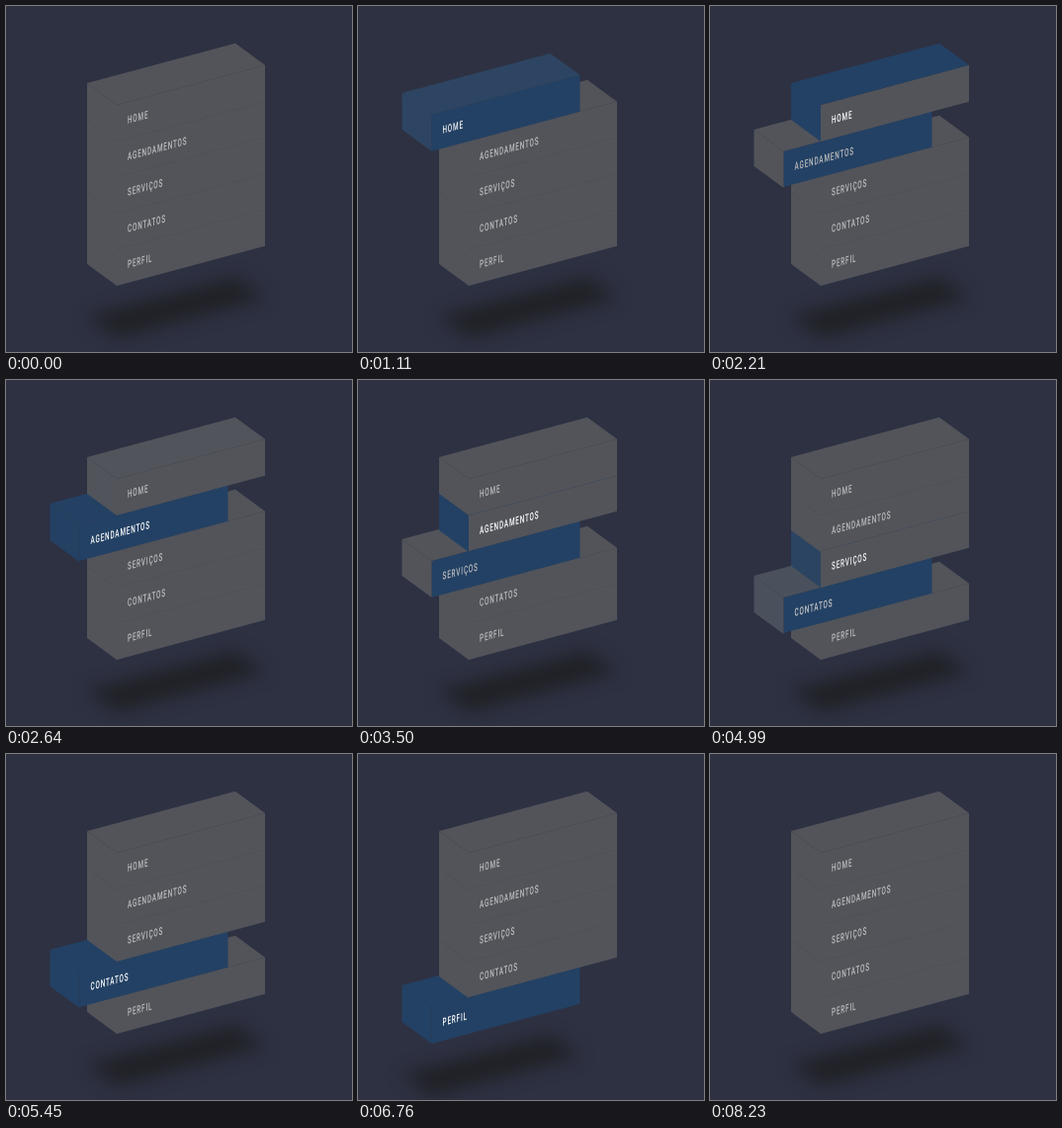
These frames come from a looping animation (350 by 350 pixels, 9.56 s). An HTML page:

```html
<!DOCTYPE html>
<html lang="pt">
<head>
<meta charset="utf-8">
<title>Menu</title>
<style>
  html, body { margin: 0; width: 100%; height: 100%; overflow: hidden; background: #2e3142; }
  ul {
    position: absolute; left: 112px; top: 100px; width: 150px;
    margin: 0; padding: 0; list-style: none;
    transform: skewY(-15deg); transform-origin: 0 0;
  }
  li { position: relative; width: 150px; height: 36.6px; }
  .side, .top { position: absolute; }
  .side { left: -30px; top: 0; width: 30px; height: 100%; transform: skewY(45deg); transform-origin: right; }
  .top { left: 0; top: -30px; width: 100%; height: 30px; transform: skewX(45deg); transform-origin: bottom; }
  li:last-child .top { box-shadow: -90px 90px 15px rgba(31, 32, 36, .9); }
  .label {
    position: absolute; left: 11.25px; top: 0; white-space: nowrap;
    font: 500 11px/38.1px Roboto, "Open Sans", sans-serif; letter-spacing: 1.4px;
    transform: scaleX(.58); transform-origin: 0 0;
  }
</style>
</head>
<body>
<ul id="menu"></ul>
<script>
const LOOP = 9560, FADE = 500, LAG = 10, SLIDE = -37.5;
const LABELS = ['HOME', 'AGENDAMENTOS', 'SERVIÇOS', 'CONTATOS', 'PERFIL'];
// Item i is hovered from HOVER[i] until HOVER[i + 1].
const HOVER = [860, 2210, 3500, 4910, 6260, 7680];
const GREY = [82, 84, 90], BLUE = [35, 65, 100];
const DIM = [189, 189, 189], WHITE = [255, 255, 255];

const menu = document.getElementById('menu');

function add(parent, tag, className = '') {
  const el = document.createElement(tag);
  el.className = className;
  return parent.appendChild(el);
}

const items = LABELS.map((text, i) => {
  const box = add(menu, 'li');
  box.style.zIndex = LABELS.length - i;
  const side = add(box, 'div', 'side');
  const top = add(box, 'div', 'top');
  const label = add(box, 'span', 'label');
  label.textContent = text;
  return { box, side, top, label };
});

const mix = (a, b, k) => `rgb(${a.map((v, i) => Math.round(v + (b[i] - v) * k))})`;

// cubic-bezier(.25, .1, .25, 1)
function ease(x) {
  if (x <= 0) return 0;
  if (x >= 1) return 1;
  const curve = (s, p, q) => 3 * (1 - s) * (1 - s) * s * p + 3 * (1 - s) * s * s * q + s * s * s;
  let lo = 0, hi = 1;
  for (let n = 0; n < 24; n++) {
    const mid = (lo + hi) / 2;
    if (curve(mid, .25, .25) < x) lo = mid; else hi = mid;
  }
  return curve(lo, .1, 1);
}

function draw(t) {
  items.forEach(({ box, side, top, label }, i) => {
    const fade = start => ease((t - start - LAG) / FADE);
    const on = t >= HOVER[i] && t < HOVER[i + 1];
    const glow = fade(HOVER[i]) - fade(HOVER[i + 1]);
    // The box jumps at once; its sides and label fade.
    box.style.transform = `translateX(${on ? SLIDE : 0}px)`;
    box.style.background = mix(GREY, BLUE, on ? 1 : 0);
    side.style.background = top.style.background = mix(GREY, BLUE, glow);
    label.style.color = mix(DIM, WHITE, glow);
  });
}

function tick() {
  draw(performance.now() % LOOP);
  requestAnimationFrame(tick);
}
tick();
</script>
</body>
</html>
```
